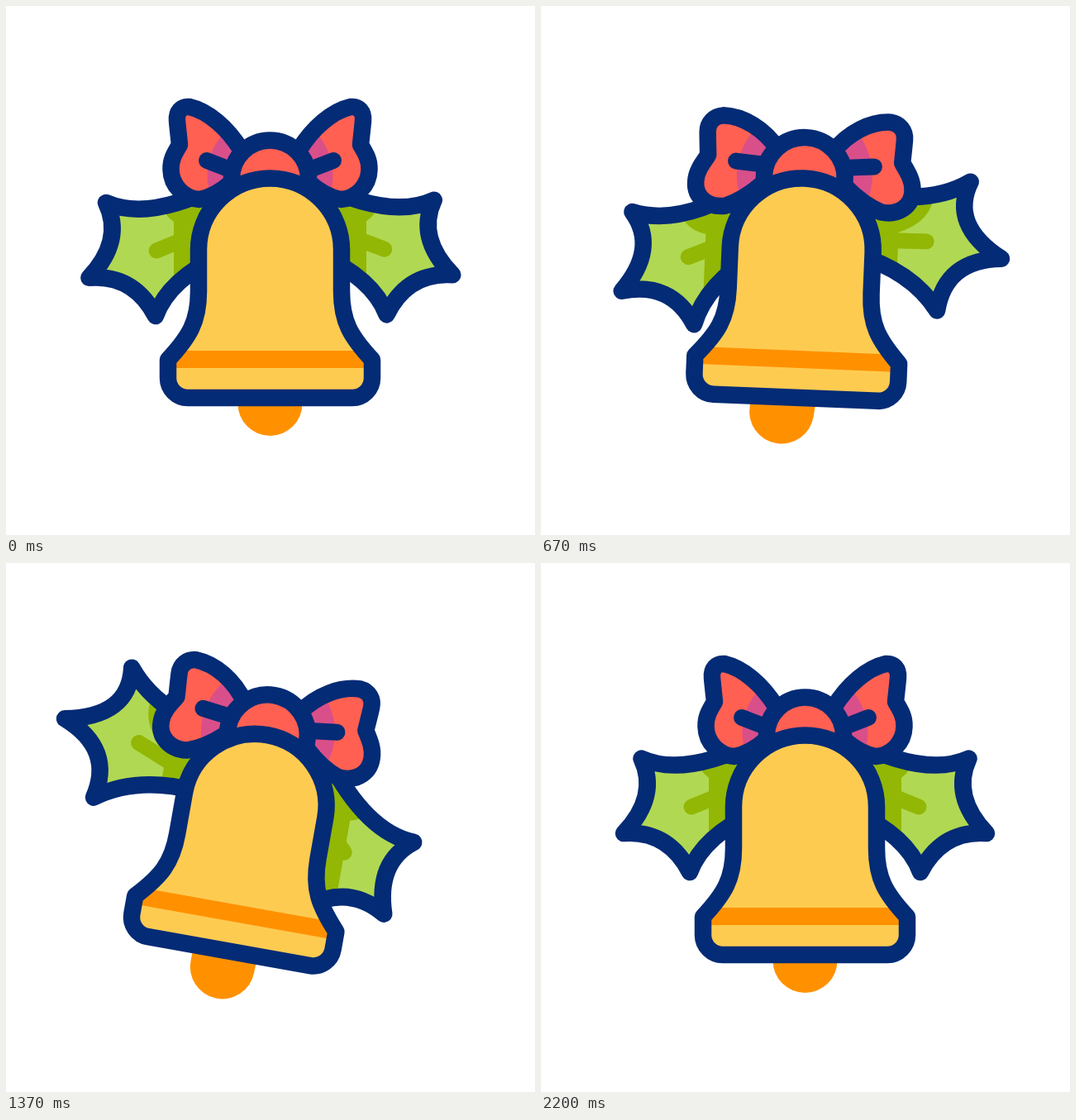
An HTML page with a canvas that plays this animation: 640 by 640 pixels, repeating every 2.23 s.

```html
<!DOCTYPE html>
<html lang="en">
<head>
<meta charset="utf-8">
<title>Ringing bell</title>
<style>
html, body { margin: 0; width: 100%; height: 100%; overflow: hidden; background: #fff; }
canvas { display: block; width: 640px; height: 640px; }
</style>
</head>
<body>
<canvas id="stage" width="640" height="640"></canvas>
<script>
const ctx = document.getElementById('stage').getContext('2d');
const LOOP = 2230, CX = 319.5;
const NAVY = '#042b75', YELLOW = '#fecb51', ORANGE = '#ff9100', RED = '#ff6052',
      PINK = '#d94f8a', LIME = '#b1d852', GREEN = '#92b705';

const BELL = new Path2D('M196 428C222 400 233 382 233 345V295A86.5 86.5 0 0 1 406 295V345' +
  'C406 382 417 400 443 428V450A24 24 0 0 1 419 474H220A24 24 0 0 1 196 450Z');
const BOW = new Path2D('M285 175C268 147 244 127 222 122C212 121 206 128 207 139' +
  'C208 150 209 158 210 168C204 178 199 186 199.5 198C200 218 216 233 234 234C246 232 258 226 272 214');
const HINGE = { x: 272, y: 265 };

// The bell turns back at each swing beat; the clapper keeps its own even beat
const SWING_BEATS = [0, 150, 500, 885, 1280, 1690, 2030, 2200];
const TONGUE_BEATS = SWING_BEATS.map((_, i) => Math.min(i * 335, 2200));

const sine = u => (1 - Math.cos(Math.PI * u)) / 2;
const quart = u => u < 0.5 ? 8 * u ** 4 : 1 - 8 * (1 - u) ** 4;

function track(t, beats, ease, poses) {
  const i = beats.findIndex(b => b > t);
  if (i < 0) return poses[poses.length - 1];
  const u = (t - beats[i - 1]) / (beats[i] - beats[i - 1]);
  return poses[i - 1] + (poses[i] - poses[i - 1]) * ease(u);
}

function poseAt(t) {
  const leafy = (...poses) => track(t + 45, SWING_BEATS, quart, poses);
  return {
    swing: track(t, SWING_BEATS, sine, [0, -5, 13.5, -13.5, 13.2, -13.5, 5, 0]),
    left: { angle: leafy(0, -8, 32, -25, 35, -23, 8, 0), grow: leafy(0, 0.2, 1, 0.1, 1, 0, 0.5, 0) },
    right: { angle: leafy(0, -9, 18, -23, 31, -23, 8, 0), grow: leafy(0, 0.5, 0.1, 1, 0, 1, 0.2, 0) },
    flap: t > 280 && t < 1880 ? sine((t - 280) / 400) : 0,
    tongue: track(t, TONGUE_BEATS, sine, [0, -10.4, 7, -16.3, 2.3, -13.5, 5, 0]),
    reach: 14 * Math.sin(Math.PI * Math.min(t / 2200, 1))
  };
}

function turn(x, y, deg) {
  ctx.translate(x, y);
  ctx.rotate(deg * Math.PI / 180);
  ctx.translate(-x, -y);
}

function scoped(draw) {
  ctx.save();
  draw();
  ctx.restore();
}

const mirrored = draw => scoped(() => {
  ctx.translate(2 * CX, 0);
  ctx.scale(-1, 1);
  draw();
});

function fill(path, color) {
  ctx.fillStyle = color;
  ctx.fill(path);
}

function stroke(path, color, width = 20.5) {
  ctx.strokeStyle = color;
  ctx.lineWidth = width;
  ctx.stroke(path);
}

const line = (x1, y1, x2, y2, color, width) =>
  stroke(new Path2D(`M${x1} ${y1}L${x2} ${y2}`), color, width);

function disc(x, y, r) {
  const path = new Path2D();
  path.arc(x, y, r, 0, 2 * Math.PI);
  return path;
}

// A raised leaf pushes its three tips away from the hinge
function leafEdge(grow) {
  const tip = (x, y) => {
    const s = 1 + 0.105 * grow;
    return `${HINGE.x + (x - HINGE.x) * s} ${HINGE.y + (y - HINGE.y) * s}`;
  };
  return new Path2D(`M262 215Q174 260 ${tip(121.5, 236.5)}Q143 282 ${tip(100, 327)}` +
    `Q154 323 ${tip(180, 374)}Q196 330 262 300`);
}

function leaf(angle, grow) {
  scoped(() => {
    turn(HINGE.x, HINGE.y, angle);
    const edge = leafEdge(grow);
    fill(edge, LIME);
    scoped(() => {
      ctx.clip(edge);
      const reach = 1 + 0.13 * grow;
      fill(new Path2D(`M${186 - 43 * grow} 235Q${195 - 49 * grow} ${258 + 24 * grow} ` +
        `208 ${262 + 28 * grow}H290V200Z`), GREEN);
      line(HINGE.x - 90 * reach, HINGE.y + 30 * reach, 214, 282 + 12 * grow, GREEN, 19);
      // the inner shadow stays upright beside the bell
      turn(HINGE.x, HINGE.y, -angle);
      ctx.fillRect(203, 150, 90, 300);
    });
    stroke(edge, NAVY);
  });
}

function bowLoop(k) {
  const bend = new DOMMatrix([1 + 0.13 * k, -0.23 * k, -0.06 * k, 1, 0, 0]);
  const edge = new Path2D();
  edge.addPath(BOW, new DOMMatrix().translate(285, 195).multiply(bend).translate(-285, -195));
  fill(edge, RED);
  scoped(() => {
    ctx.clip(edge);
    fill(disc(CX, 205, 76 + 6 * k), PINK);
  });
  stroke(edge, NAVY);
  line(243 - 7 * k, 187 + 4 * k, 274, 199 - 5 * k, NAVY, 20);
}

function render(t) {
  const p = poseAt(t);
  ctx.fillStyle = '#fff';
  ctx.fillRect(0, 0, 640, 640);
  scoped(() => {
    ctx.lineCap = ctx.lineJoin = 'round';
    turn(CX, 190, p.swing);
    leaf(p.left.angle, p.left.grow);
    mirrored(() => leaf(-p.right.angle, p.right.grow));

    bowLoop(p.flap);
    mirrored(() => bowLoop(p.flap));
    const knot = disc(CX, 209 - p.flap, 46.5 + 2.4 * p.flap);
    fill(knot, RED);
    stroke(knot, NAVY);

    scoped(() => {
      turn(CX, 361, p.tongue);
      line(CX, 400, CX, 481 + p.reach, ORANGE, 78);
    });

    fill(BELL, YELLOW);
    scoped(() => {
      ctx.clip(BELL);
      ctx.fillStyle = ORANGE;
      ctx.fillRect(190, 417, 260, 21);
    });
    stroke(BELL, NAVY);
  });
}

const start = performance.now();
function tick() {
  render((performance.now() - start) % LOOP);
  requestAnimationFrame(tick);
}
tick();
</script>
</body>
</html>
```
